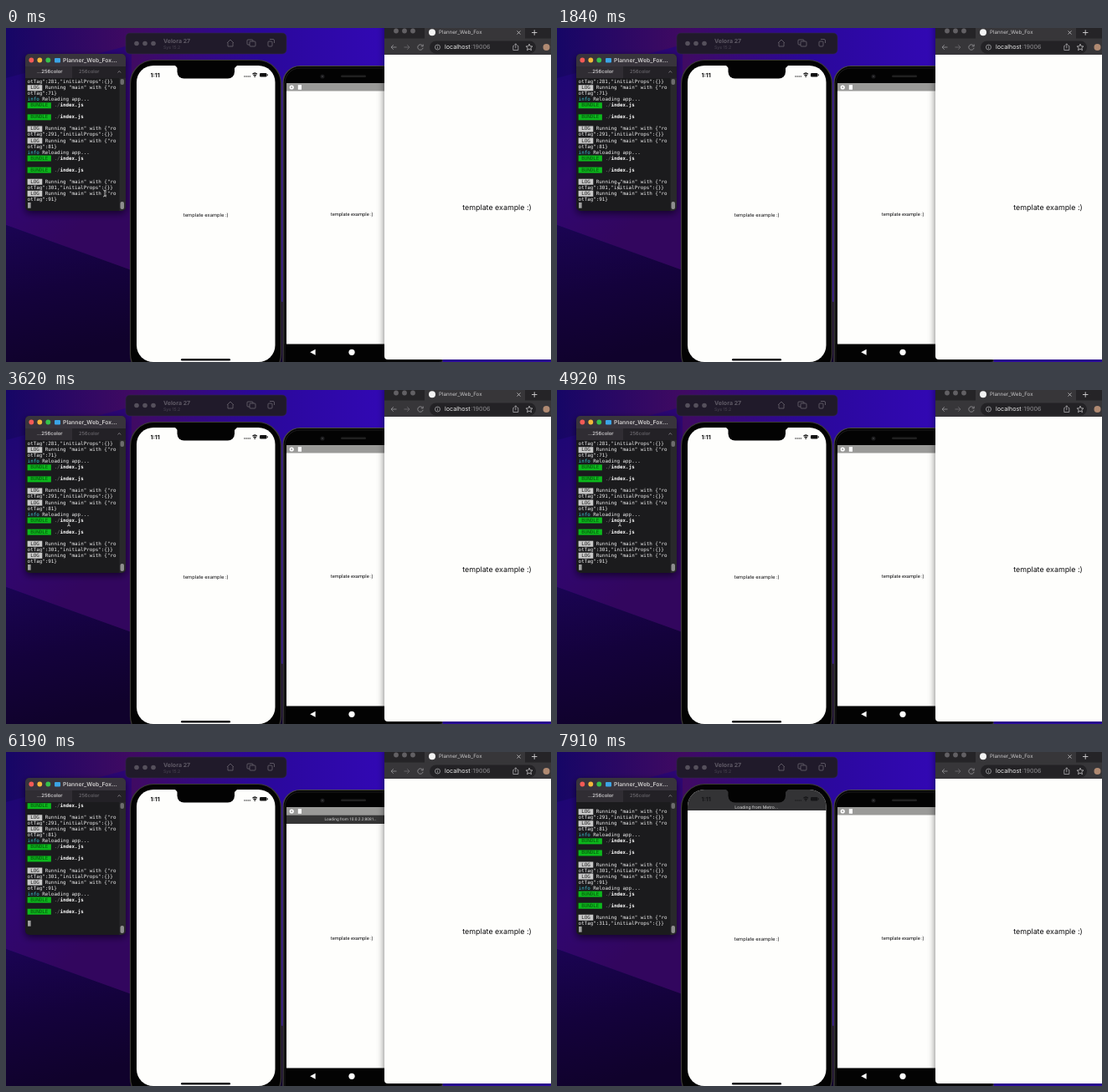
An HTML page with a canvas for the animation above (8000 ms loop, 651 px wide and 400 px high).

```html
<!DOCTYPE html>
<html lang="en">
<head>
<meta charset="utf-8">
<title>Live reload</title>
<style>
html, body { margin: 0; width: 100%; height: 100%; overflow: hidden; background: #14043c; }
canvas { display: block; width: 651px; height: 400px; }
</style>
</head>
<body>
<canvas id="stage"></canvas>
<script>
const W = 651, H = 400, LOOP = 8000;
const SANS = 'Inter, sans-serif', ROBOTO = 'Roboto, sans-serif', MONO = '"DejaVu Sans Mono", monospace';
const INK = '#0c0c0e', PAGE = '#fefefc', BEZEL = '#030303';
const canvas = document.getElementById('stage');
const c = canvas.getContext('2d');
const dpr = window.devicePixelRatio || 1;
canvas.width = W * dpr;
canvas.height = H * dpr;
c.textRendering = 'geometricPrecision';

// Moments when the apps react to the reload
const TIME = {
  reload: 5620, bundle1: 5940, bundle2: 6060, blank: 5960,
  droidBar: 6060, droidDone: 7640, phoneBar: 6380, phoneDone: 7080, log: 7080
};

function rect(x, y, w, h, fill) {
  c.fillStyle = fill;
  c.fillRect(x, y, w, h);
}

function round(x, y, w, h, r, fill, stroke, line = 1) {
  c.beginPath();
  c.roundRect(x, y, w, h, r);
  if (fill) { c.fillStyle = fill; c.fill(); }
  if (stroke) { c.strokeStyle = stroke; c.lineWidth = line; c.stroke(); }
}

function dot(x, y, r, fill) {
  c.beginPath();
  c.arc(x, y, r, 0, 7);
  c.fillStyle = fill;
  c.fill();
}

function shape(points, fill) {
  c.beginPath();
  points.forEach(([x, y]) => c.lineTo(x, y));
  c.closePath();
  c.fillStyle = fill;
  c.fill();
}

function stroke(path, color, width = 0.8) {
  c.strokeStyle = color;
  c.lineWidth = width;
  c.stroke(new Path2D(path));
}

function text(str, x, y, size, fill, { font = SANS, weight = 400, align = 'left' } = {}) {
  c.font = `${weight} ${size}px ${font}`;
  c.textAlign = align;
  c.textBaseline = 'middle';
  c.fillStyle = fill;
  c.fillText(str, x, y);
}

function gradient(x0, y0, x1, y1, ...stops) {
  const g = c.createLinearGradient(x0, y0, x1, y1);
  stops.forEach((color, i) => g.addColorStop(i / (stops.length - 1), color));
  return g;
}

function wallpaper() {
  rect(0, 0, W, H, gradient(0, 0, 452, 0, '#160666', '#400a62', '#2a089a', '#3208b4'));
  shape([[0, 60], [150, 20], [150, 290], [0, 236]], gradient(0, 60, 130, 200, '#1e0674', '#300672', '#32065e'));
  shape([[0, 236], [150, 290], [340, 330], [340, 400], [0, 400]], gradient(0, 240, 40, 400, '#1a0452', '#14023c', '#10022c'));
}

const log = tag => [['log', 'Running "main" with {"ro'], ['raw', tag]];
const mount = n => log(`otTag":${n},"initialProps":{}}`);
const bundle = ['bundle'], gap = ['raw', ''], info = ['info'];
const rebuild = [info, bundle, gap, bundle, gap];
const history = [
  mount(281)[1], ...log('otTag":71}'), ...rebuild,
  ...mount(291), ...log('otTag":81}'), ...rebuild,
  ...mount(301), ...log('otTag":91}'), ...rebuild,
  ...mount(311)
];

// Number of printed lines, and the index of the top visible line
function logState(t) {
  if (t < TIME.reload) return [21, 0];
  if (t < TIME.bundle1) return [22, 1];
  if (t < TIME.bundle2) return [24, 4];
  if (t < TIME.log) return [26, 6];
  return [28, 7];
}

const CELL = 3.534, LEFT = 25.6, TOP = 64.7, PITCH = 7.03;

function logLine([kind, str], y) {
  const put = (s, col, fill, weight = 400) =>
    text(s, LEFT + col * CELL, y, 5.87, fill, { font: MONO, weight });
  const chip = (cols, fill) => rect(LEFT, y - 3.5, cols * CELL, 7, fill);
  if (kind === 'raw') put(str, 0, '#f0f0f0');
  if (kind === 'info') {
    put('info', 0, '#3fc4d8');
    put('Reloading app...', 5, '#f0f0f0');
  }
  if (kind === 'log') {
    chip(5, '#c8c8c8');
    put('LOG', 1, '#1a1a1a');
    put(str, 6, '#f0f0f0');
  }
  if (kind === 'bundle') {
    chip(8, '#0cb91c');
    put('BUNDLE', 1, '#064c0c');
    put('./', 9, '#7c7c7c');
    put('index.js', 11, '#ffffff', 700);
  }
}

function terminal(t) {
  c.save();
  c.shadowColor = 'rgba(0,0,10,.6)';
  c.shadowBlur = 9;
  c.shadowOffsetY = 3;
  round(23, 31, 120, 188, 5, '#1b1b1d');
  c.restore();
  c.save();
  round(23, 31, 120, 188, 5);
  c.clip();
  rect(23, 31, 120, 15, '#38343c');
  rect(23, 46, 120, 14, '#232126');
  rect(23, 46, 56, 14, '#302d33');
  rect(135.5, 60, 7.5, 159, '#29292b');
  c.restore();
  ['#f45a56', '#f3b73a', '#36c24a'].forEach((color, i) => dot(30.3 + i * 10, 38.5, 2.9, color));
  round(58, 36, 7, 5.5, 1, '#3ba4e6');
  text('Planner_Web_Fox…', 68, 38.5, 6.8, '#cccaca', { weight: 600 });
  text('…256color', 37, 52.7, 5.9, '#e0dfe0', { weight: 500 });
  text('256color', 87, 52.7, 5.8, '#7b787e');
  stroke('M133.5 53.5 l1.8 -2 l1.8 2', '#8e8b90');
  round(136.5, 61, 4.5, 7, 2, '#6c6c6c');
  round(136.5, 208, 4.5, 9, 2, '#8e8e8e');

  const [count, top] = logState(t);
  history.slice(top, count).forEach((line, i) => logLine(line, TOP + i * PITCH));
  rect(LEFT + 0.4, TOP + (count - top) * PITCH - 3.4, 3.6, 6.8, '#a0a0a0');
}

function simulatorBar() {
  round(143, 6, 192, 25, 5, '#201a2a', '#302648', 0.6);
  for (let i = 0; i < 3; i++) dot(156 + i * 10, 18.5, 2.8, '#55505c');
  text('Velora 27', 188, 15.5, 7, '#5f5a66', { weight: 700 });
  text('Sys 15.2', 188, 23, 5.2, '#4c4754');
  const dim = '#6a6570';
  stroke('M264 18 l4 -4 l4 4 M265 17.5 v4.5 h6 v-4.5', dim);
  round(288, 14, 7, 6, 1, null, dim, 0.8);
  round(291, 16, 7, 6, 1, '#201a2a', dim, 0.8);
  round(313, 16, 5, 6, 1, null, dim, 0.8);
  stroke('M315 13.5 h4 q1.5 0 1.5 1.5 v3', dim);
}

function phone(t) {
  round(148.5, 38.5, 180, 380, 28, BEZEL, '#3c3a36', 1.2);
  c.save();
  round(156, 45, 165.5, 355, 20);
  c.clip();
  rect(156, 45, 166, 356, PAGE);
  const loading = t >= TIME.phoneBar;
  if (loading) rect(156, 45, 166, 25, '#333335');
  c.restore();
  shape([[201, 44], [277, 44], [273, 48], [205, 48]], BEZEL);
  round(204.5, 43, 68.5, 17.5, [0, 0, 8, 8], BEZEL);

  const mark = loading ? '#161618' : '#111111';
  text('1:11', 172.5, 56.5, 7, mark, { weight: 700 });
  for (let i = 0; i < 4; i++) dot(285 + i * 2.1, 58, 0.65, mark);
  stroke('M294.5 55.3 q2.7 -2.6 5.4 0 M295.6 57 q1.6 -1.5 3.2 0', mark, 1.2);
  dot(297.2, 58.3, 0.8, mark);
  round(303, 54, 8.5, 4.6, 1.3, mark);
  rect(312, 55.4, 0.8, 1.8, mark);
  if (loading) text('Loading from Metro...', 238.2, 66, 5.1, '#e0e0e0', { align: 'center' });
  if (t < TIME.blank || t >= TIME.phoneDone)
    text('template example :)', 238.8, 224, 5.8, INK, { align: 'center' });
  round(209, 396, 59, 2.4, 1.2, '#0c0c10');
}

function android(t) {
  round(331, 45.5, 190, 380, 20, BEZEL, '#4c4a48', 1.2);
  round(333, 48, 186, 376, 18, null, '#1c1c1c', 1);
  dot(378, 58, 2.6, '#1a1a1c');
  dot(378, 58, 1.1, '#37373a');
  round(400, 56.5, 30, 2.5, 1.2, '#202020');
  rect(335, 66, 117, 312.5, PAGE);
  rect(335, 66, 117, 9.5, '#9a9a98');
  dot(341.2, 71, 2.6, '#ffffff');
  dot(341.2, 71, 0.9, '#9a9a98');
  rect(348.8, 68.2, 4.2, 5.6, '#ffffff');
  if (t >= TIME.droidBar && t < TIME.droidDone) {
    rect(335, 75.5, 117, 10.5, '#363636');
    text('Loading from 10.0.2.2:8081…', 411.5, 81, 4.8, '#d4d4d4', { font: ROBOTO, align: 'center' });
  }
  text('template example :)', 413.2, 223, 5.75, INK, { font: ROBOTO, align: 'center' });
  shape([[363.2, 388.3], [369.6, 384.8], [369.6, 391.8]], '#ffffff');
  dot(413, 388.3, 3.6, '#ffffff');
}

function browser() {
  c.save();
  c.shadowColor = 'rgba(0,0,0,.55)';
  c.shadowBlur = 9;
  round(452, -8, 204, 405, 4, PAGE);
  c.restore();
  rect(452, 0, 199, 13, '#252427');
  rect(500, 0, 120, 13, '#373639');
  rect(452, 12.5, 199, 19.5, '#373639');
  for (let i = 0; i < 3; i++) dot(466 + i * 10, 3.5, 2.9, '#626064');
  dot(509, 5.3, 4, '#f4f4f4');
  text('Planner_Web_Fox', 517, 5.5, 6.2, '#c8c7c9');
  stroke('M610.5 3.5 l4 4 m0 -4 l-4 4', '#c8c7c9');
  stroke('M628 5.5 h6.4 m-3.2 -3.2 v6.4', '#d4d3d5', 0.9);

  stroke('M466.5 23 h-6.5 m2.8 -2.8 l-2.8 2.8 l2.8 2.8', '#8e8d90', 0.9);
  stroke('M475.5 23 h6.5 m-2.8 -2.8 l2.8 2.8 l-2.8 2.8', '#69686b', 0.9);
  stroke('M497.8 21.5 a3.2 3.2 0 1 0 0.3 2.3 M498.2 19.5 v2.4 h-2.4', '#8e8d90', 0.9);
  round(506, 15.5, 127, 15, 7.5, '#232225');
  c.beginPath();
  c.arc(515.5, 23, 3, 0, 7);
  c.lineWidth = 0.8;
  c.strokeStyle = '#a8a7aa';
  c.stroke();
  stroke('M515.5 22.5 v2.2 m0 -3.8 v0.8', '#a8a7aa');
  text('localhost', 524, 23.2, 7.2, '#eaeaea');
  text(':19006', 555.5, 23.2, 7.2, '#8f8e91');
  stroke('M606.8 21.5 h-1 v5 h6 v-5 h-1 M608.8 24.3 v-5.5 m-1.8 1.8 l1.8 -1.8 l1.8 1.8', '#aeadb0');
  stroke('M625 19.2 l1.1 2.6 l2.8 .2 l-2.1 1.8 l.7 2.8 l-2.5 -1.5 l-2.5 1.5 l.7 -2.8 l-2.1 -1.8 l2.8 -.2 z', '#c4c3c6');
  dot(645.5, 23, 4, '#b08a72');
  text('template example :)', 586.5, 215.5, 8.9, INK, { align: 'center' });
}

// Pointer stops as [time, x, y]: two moves with a rest after each
const path = [[0, 118, 198], [820, 74, 189], [2450, 74, 189], [3240, 75, 159], [TIME.reload, 75, 159]];

function pointer(t) {
  if (t >= TIME.reload) return;
  const i = path.findIndex(p => p[0] > t);
  const [t0, x0, y0] = path[i - 1], [t1, x1, y1] = path[i];
  const u = (t - t0) / (t1 - t0), k = u * u * (3 - 2 * u);
  c.save();
  c.translate(x0 + (x1 - x0) * k, y0 + (y1 - y0) * k);
  const beam = 'M-2 -4 q2 0 2 1.5 q0 -1.5 2 -1.5 M0 -3 v6 M-2 4 q2 0 2 -1.5 q0 1.5 2 1.5';
  stroke(beam, '#111112', 1.9);
  stroke(beam, '#cccccc', 0.9);
  c.restore();
}

function draw() {
  const t = performance.now() % LOOP;
  c.setTransform(dpr, 0, 0, dpr, 0, 0);
  wallpaper();
  terminal(t);
  simulatorBar();
  phone(t);
  android(t);
  browser();
  pointer(t);
  requestAnimationFrame(draw);
}
draw();
</script>
</body>
</html>
```
